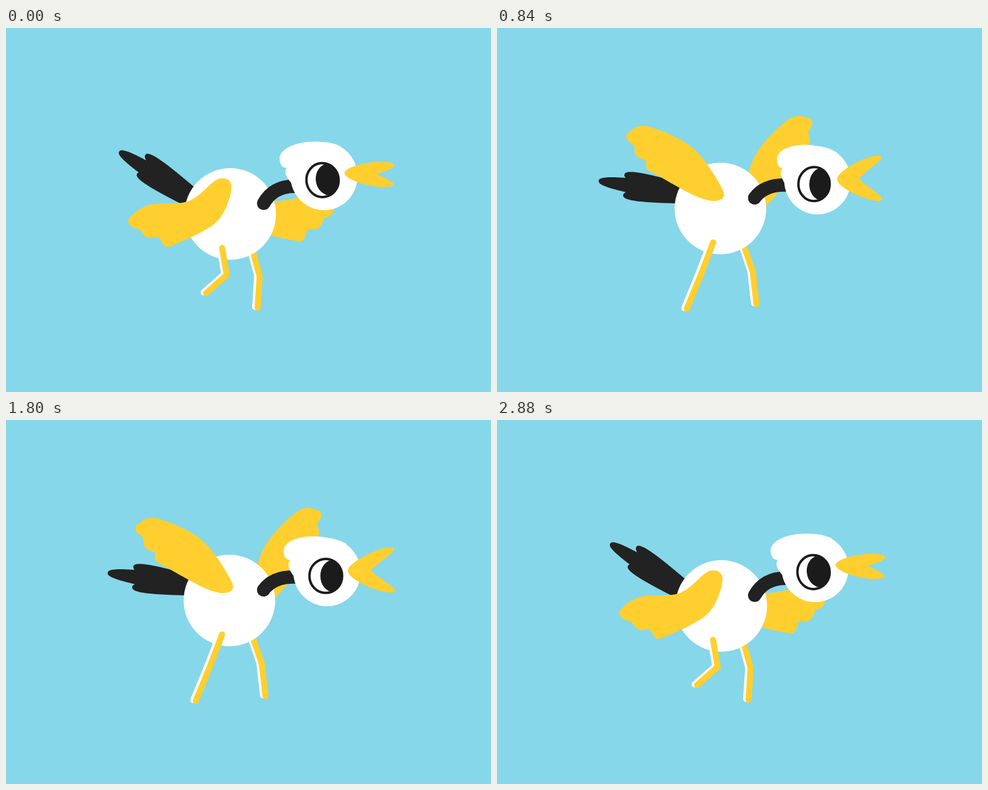
Animation, 800 px wide and 600 px high, one loop 2920 ms. Source, as an HTML page with a canvas:

```html
<!DOCTYPE html>
<html lang="en">
<head>
<meta charset="utf-8">
<title>Running bird</title>
<style>
html, body { margin: 0; width: 100%; height: 100%; overflow: hidden; background: #86d7e9; }
canvas { display: block; }
</style>
</head>
<body>
<canvas id="stage" width="800" height="600"></canvas>
<script>
const ctx = document.getElementById('stage').getContext('2d');
const YELLOW = '#ffcf2f', DARK = '#222', WHITE = '#fff', SKY = '#86d7e9';
const LOOP = 2920, FRAME = 40, CYCLE = 2880, STRIDE = 480, FLAP = 240;
const FLAP_TIMES = [0, 40, 120, 160];
const { sin, cos, PI } = Math;
const RAD = PI / 180;

const lerp = (a, b, k) => a + (b - a) * k;
const smooth = u => u * u * (3 - 2 * u);
const wave = (a, mid, c1, s1, c2 = 0, s2 = 0) =>
  mid + c1 * cos(a) + s1 * sin(a) + c2 * cos(2 * a) + s2 * sin(2 * a);

// Periodic cubic spline through the four flap poses
function flap(vals, t) {
  const n = vals.length, wrap = i => (i + n) % n;
  const at = i => FLAP_TIMES[wrap(i)] + Math.floor(i / n) * FLAP;
  const slope = i => (vals[wrap(i + 1)] - vals[wrap(i - 1)]) / (at(i + 1) - at(i - 1));
  t %= FLAP;
  let i = n - 1;
  while (at(i) > t) i--;
  const h = at(i + 1) - at(i), u = (t - at(i)) / h;
  return lerp(vals[i], vals[wrap(i + 1)], smooth(u))
    + h * u * (1 - u) * ((1 - u) * slope(i) - u * slope(i + 1));
}

// Draws with a temporary coordinate system
function within(x, y, turn, sx, paint) {
  ctx.save();
  ctx.translate(x, y);
  ctx.scale(sx, 1);
  ctx.rotate(turn);
  paint();
  ctx.restore();
}

function fill(color) {
  ctx.fillStyle = color;
  ctx.fill();
}

function ellipse(x, y, rx, ry, color, tilt = 0) {
  ctx.beginPath();
  ctx.ellipse(x, y, rx, ry, tilt, 0, 2 * PI);
  fill(color);
}

// Wing key points: shoulder (2), rear edge, last lobe, two notches, tip, front edge (2)
const wingDown = [[350,249], [372,262], [348,319], [275,358], [252,344], [221,332], [203,314], [235,292], [302,285]];
const wingMid = [[370,277], [369,299], [335,302], [255,316], [235,311], [207,305], [181,290], [222,253], [305,237]];
const wingUp = [[371,264], [366,284], [330,278], [258,239], [246,218], [226,193], [216,173], [248,162], [322,197]];
const wingTop = wingUp.map(([x, y]) => {
  const dx = x - 360, dy = y - 270, a = 12 * RAD;
  return [360 + dx * cos(a) - dy * sin(a), 259 + dx * sin(a) + dy * cos(a)];
});
const wingPose = t => wingDown.map((p, i) => p.map((v, axis) =>
  flap([v, wingMid[i][axis], wingUp[i][axis], wingTop[i][axis]], t)));

function wing(keys) {
  const pts = keys.flatMap((p, i) => {
    if (i < 3 || i > 5) return [p];
    const [x, y] = keys[i + 1], dx = x - p[0], dy = y - p[1];
    return [p, [p[0] + dx / 2 + dy / 4, p[1] + dy / 2 - dx / 4]];
  });
  const n = pts.length, notch = i => i === 5 || i === 7;
  const pt = i => pts[(i + n) % n];
  const handle = (i, from, to, axis) => (pt(to)[axis] - pt(from)[axis]) / 6;
  ctx.beginPath();
  ctx.moveTo(...pts[0]);
  for (let i = 0; i < n; i++) {
    const [a, b] = [pt(i), pt(i + 1)];
    const before = notch(i) ? i : i - 1, after = notch(i + 1) ? i + 1 : i + 2;
    ctx.bezierCurveTo(a[0] + handle(i, before, i + 1, 0), a[1] + handle(i, before, i + 1, 1),
      b[0] - handle(i, i, after, 0), b[1] - handle(i, i, after, 1), ...b);
  }
  fill(YELLOW);
}

// The far wing mirrors the near one, hung from its outer notch
function farWing(keys, t) {
  within(flap([525, 525, 513, 500], t), flap([314, 321, 171, 150], t),
    flap([12, 0, 22, 22], t) * RAD, -1, () => {
      const [x, y] = keys[5];
      wing(keys.map(p => [p[0] - x, p[1] - y]));
    });
}

function feather(length, angle, baseY) {
  const x = 310 - length * cos(angle), y = 280 - length * sin(angle);
  const dist = Math.hypot(310 - x, baseY - y);
  within(x, y, Math.atan2(baseY - y, 310 - x), 1, () => {
    ctx.beginPath();
    ctx.moveTo(0, 0);
    ctx.bezierCurveTo(-1, -9, 32, -13, dist, -16);
    ctx.lineTo(dist, 16);
    ctx.bezierCurveTo(32, 13, -1, 9, 0, 0);
    fill(DARK);
  });
}

function tail(beat, bodyY) {
  const angle = wave(beat, 21.5, 10.3, -5.6);
  feather(145, angle * RAD, bodyY - 24);
  feather(107, (angle + 10) * RAD, bodyY - 24);
  feather(102, (angle - 9) * RAD, bodyY - 24);
}

function leg(x, hipY, a) {
  const knee = [x + wave(a, 360.6, -2.7, 18.5, 6.1, 12), wave(a, 406.3, -1, -2.5, 1.7, 6)];
  const foot = [x + wave(a, 347, -18, 33, 1, 4), wave(a, 454, -12, -4, -5)];
  ctx.lineWidth = 10;
  ctx.lineCap = 'round';
  ctx.lineJoin = 'miter';
  for (const [shift, color] of [[-4, WHITE], [0, YELLOW]]) {
    within(shift, shift / 3, 0, 1, () => {
      ctx.beginPath();
      ctx.moveTo(x + 356.5, hipY);
      ctx.lineTo(...knee);
      ctx.lineTo(...foot);
      ctx.strokeStyle = color;
      ctx.stroke();
    });
  }
}

function neck(beat, bodyY) {
  const y = wave(beat, 260, 1, 9.8);
  ctx.beginPath();
  ctx.moveTo(425, bodyY - 17.5);
  ctx.quadraticCurveTo(442, y - 2, 480, y);
  ctx.lineWidth = 22;
  ctx.lineCap = 'round';
  ctx.strokeStyle = DARK;
  ctx.stroke();
}

// Head turn: 0 looks left, 1 looks right, alternating between these times
const lookTimes = [-660, 140, 400, 1060, 1310, 1790, 2220, 3020];
function headTurn(t) {
  const i = lookTimes.findIndex(time => time > t);
  const u = smooth((t - lookTimes[i - 1]) / (lookTimes[i] - lookTimes[i - 1]));
  return i % 2 ? u : 1 - u;
}

function gape(t) {
  const u = t % 960;
  if (u < 320) return smooth(u / 320);
  return u < 840 ? 1 : 1 - smooth((u - 840) / 120);
}

function skull(k) {
  const x = lerp(473, 458, k), y = 3 * (1 - k);
  ellipse(lerp(526, 529.5, k), 251 + y / 3, lerp(53, 55.5, k), 56, WHITE);
  ctx.beginPath();
  ctx.moveTo(x, 216 + y);
  ctx.bezierCurveTo(x, 192 + y, 515, 182 + y, lerp(555, 562, k), 204 + y);
  ctx.lineTo(530, 250);
  ctx.lineTo(480, 264);
  ctx.quadraticCurveTo(lerp(471, 459, k), 240, lerp(477, 469, k), 231);
  ctx.quadraticCurveTo(x, 230, x, 216 + y);
  fill(WHITE);
}

function eye(k, beat) {
  const rx = lerp(22.5, 27, k), tilt = lerp(0.12, 0, k);
  const squint = 10 * Math.max(0, cos(beat - PI / 3)) ** 2;
  const left = 18 - rx - squint, pupil = (rx - left) * 0.6;
  within(lerp(510, 527.5, k), lerp(258, 257, k), 0, 1, () => {
    ellipse(0, 0, rx, 28, WHITE, tilt);
    ctx.save();
    ctx.clip();
    ellipse(left + pupil, 0, pupil, 26.5, '#1b1b1b', tilt);
    ctx.restore();
    ctx.beginPath();
    ctx.ellipse(0, 0, rx, 28, tilt, 0, 2 * PI);
    ctx.lineWidth = 4;
    ctx.strokeStyle = '#1b1b1b';
    ctx.stroke();
  });
}

function jaw(angle, side) {
  ctx.save();
  ctx.rotate(angle * RAD);
  ctx.scale(1, side);
  ctx.beginPath();
  ctx.moveTo(0, 0);
  ctx.bezierCurveTo(6, -14, 76, -14, 85, -1);
  ctx.bezierCurveTo(86, 6, 54, 8, 34, 15.6);
  fill(YELLOW);
  ctx.restore();
}

function head(t, beat) {
  const k = headTurn(t), open = gape(t);
  const dip = -0.5 - cos(beat + PI / 3);
  within(527 + 4.5 * dip, 252 + 6.5 * dip, 6 * RAD * dip, 1, () => {
    ctx.translate(-527, -252);
    skull(k);
    eye(k, beat);
    within(lerp(553, 564, k), lerp(251, 249, k), 0, lerp(0.81, 1, k), () => {
      jaw(lerp(-2.5, -25.7, open), 1);
      jaw(lerp(18.6, 22.8, open), -1);
    });
  });
}

function draw(t) {
  const beat = t / FLAP * 2 * PI, stride = t / STRIDE * 2 * PI;
  const bodyY = wave(beat, 302, 4.5, 15.9);
  const keys = wingPose(t);
  ctx.fillStyle = SKY;
  ctx.fillRect(0, 0, 800, 600);
  farWing(keys, t);
  tail(beat, bodyY);
  leg(49, bodyY + 56, stride + PI);
  ellipse(369.2 + 0.7 * cos(beat), bodyY, 75.5, 75.5, WHITE);
  leg(0, bodyY + 56, stride);
  neck(beat, bodyY);
  wing(keys);
  head(t, beat);
}

const start = performance.now();
function tick() {
  const t = (performance.now() - start) % LOOP;
  draw(Math.floor(t / FRAME) * FRAME % CYCLE);
  requestAnimationFrame(tick);
}
tick();
</script>
</body>
</html>
```
